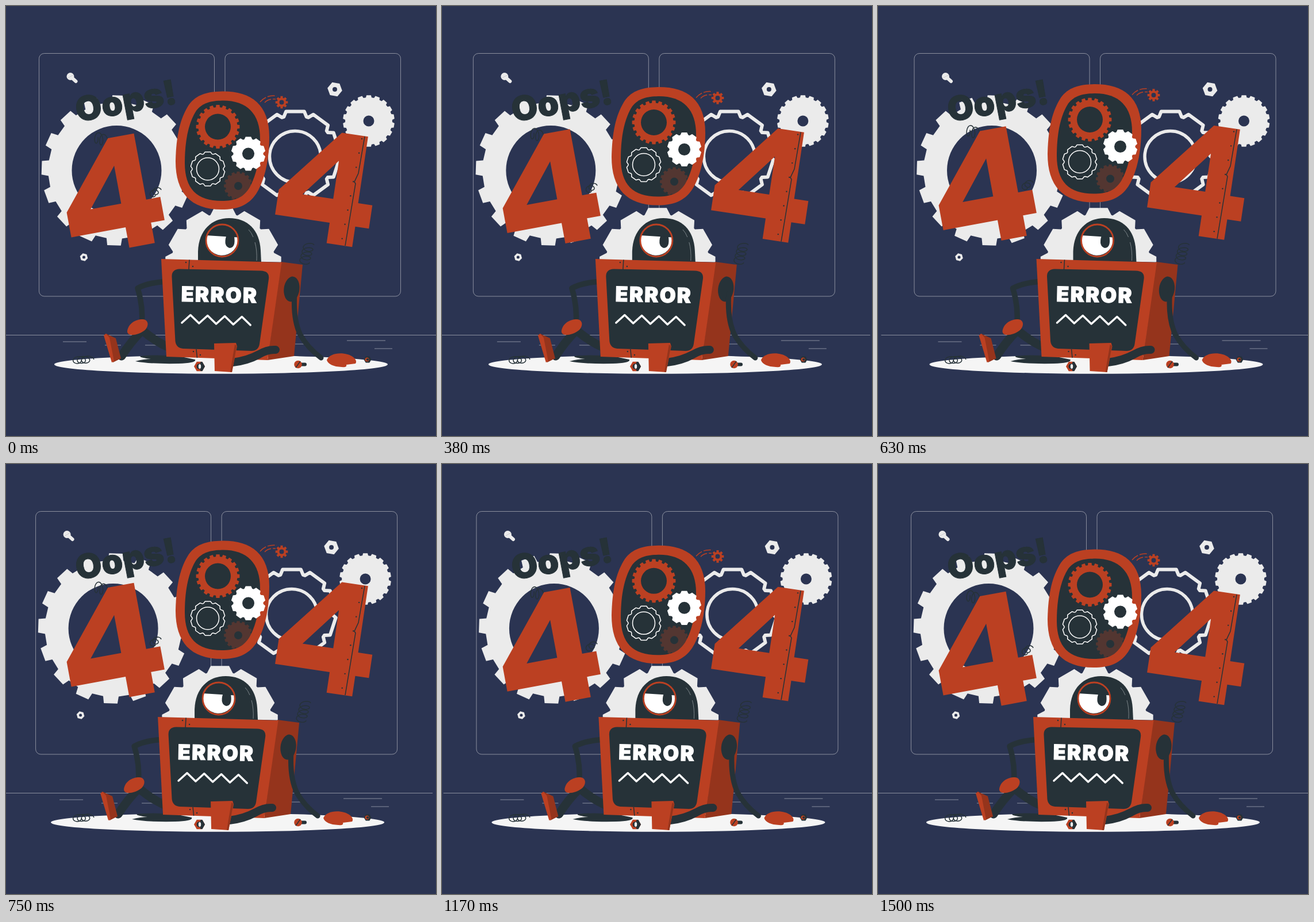
An HTML page for the animation above (1540 ms loop, 748 by 748 pixels).

```html
<!DOCTYPE html>
<html lang="en">
<head>
<meta charset="utf-8">
<title>404</title>
<style>
  html, body { margin: 0; width: 100%; height: 100%; overflow: hidden; background: #2b3452; }
  svg { display: block; width: 100vw; height: 100vh; }
  text { font-family: Inter, "Open Sans", sans-serif; font-weight: 900; }
  .ink { fill: #263238; }
  .red { fill: #bb4022; }
  .deep { fill: #95341c; }
  .pale { fill: #ebebeb; }
  .white { fill: #fff; }
  .faint { fill: #bb4022; opacity: .3; }
  .line { fill: none; stroke: #263238; stroke-width: 1.5; }
  .limb { fill: none; stroke: #263238; stroke-linejoin: round; stroke-linecap: round; }
  .wall { fill: none; stroke: #ebebeb; stroke-width: .5; }
</style>
</head>
<body>
<svg viewBox="0 0 748 748">
  <defs>
    <path id="four" fill-rule="evenodd" d="M-2 -158H44V-41H69V0H45V36H0V0H-96V-44Z M0 -109V-42H-54Z"/>
    <path id="slope" d="M125 202Q220 185 320 165"/>
    <clipPath id="aboveBox"><path d="M260 340H500V446L270 441Z"/></clipPath>
  </defs>

  <g id="shake">
    <g class="wall">
      <rect x="57.5" y="82.5" width="305" height="422.5" rx="9"/>
      <rect x="381" y="82.5" width="305.5" height="422.5" rx="9"/>
      <path d="M0 572.5H748M99 584H140M172 590H200M242 590H270M502 588H518M593 582H660M641 596H672"/>
    </g>
    <g id="wallGears"></g>
    <path d="M112 122.5L121.500 131" stroke="#ebebeb" stroke-width="6" stroke-linecap="round"/>
    <circle class="pale" cx="112" cy="122.500" r="6.500"/>
    <path d="M108 125L117 120" stroke="#c9c9cd"/>

    <ellipse cx="374" cy="623.5" rx="290" ry="16.200" fill="#f5f5f5"/>
    <path class="ink" d="M225 618Q240 614 252 614Q230 611 234 609Q255 606 300 609L329 615Q332 621 300 622Q250 623 225 618Z"/>
    <g id="domeGear" clip-path="url(#aboveBox)"></g>

    <path class="ink" d="M334 446V427C335 390 358 369 388 369C420 369 441 389 443 425L444 446Z"/>
    <path d="M422 389Q427 394 430 402M433 411Q437 425 436 443" fill="none" stroke="#7b8488"/>
    <circle cx="376" cy="408" r="28" class="ink"/>
    <path class="white" d="M348.500 399L403.500 402.500A28 28 0 1 1 348.500 399Z"/>
    <path class="ink" d="M383 400.500L397 401Q400 420 389 421Q378 418 383 400.500Z"/>
    <circle cx="376" cy="408" r="28" fill="none" stroke="#bb4022" stroke-width="2.8"/>

    <path class="limb" stroke-width="9.500" d="M274 479.500Q245 482 229 491Q238 520 236.500 548"/>
    <path class="limb" stroke-width="15" d="M284 594Q260 584 237 564Q217 584 201 609"/>
    <path class="red" d="M211 565C213 553 224 545 238 545C249 546 249 558 240 565C229 573 210 576 211 565Z"/>
    <path class="deep" d="M174 570L191 578L200 613L186 620L171 572Z"/>
    <path class="red" d="M170 573L174 570L180 577L188 618L184 620Z"/>

    <path class="deep" d="M478 445L516 450L501 609L455 616Z"/>
    <path class="red" d="M270 440L479.500 446L455 616L279 610Z"/>
    <path class="ink" d="M302 457.500L443 460.500Q459 461 457 475L441 588Q439 600 427 600L308 596Q296 595 294.500 583L288.500 471Q288 458 302 457.500Z"/>
    <path class="line" d="M319 441.500L318 458M331 597L332.500 612"/>
    <g id="rivets" class="ink"></g>
    <text class="white" font-size="36" letter-spacing="2.3" stroke="#fff" stroke-width="1.2" transform="translate(304.500 513.800) rotate(1.200)">ERROR</text>
    <path id="zigzag" fill="none" stroke="#fff" stroke-width="3.500" stroke-linecap="round" stroke-linejoin="round"/>

    <ellipse class="ink" cx="497" cy="492.500" rx="13.500" ry="22" transform="rotate(7 497 492)"/>
    <path class="limb" stroke-width="9" d="M502 500Q499 545 512 572Q525 595 548 612"/>
    <path class="red" d="M558 616C562 605 580 602 594 606C605 609 612 617 608 622L592 624Q594 629 584 628Q562 627 558 616Z"/>
    <path class="limb" stroke-width="14" d="M394 620Q420 617 440 606Q455 597 469 598"/>
    <path class="red" d="M362 587L400 586L402 592L393 637L363 635Z"/>
    <path class="deep" d="M398 589L401.500 591L393 637L390 636.500Z"/>
  </g>

  <g id="still">
    <text class="ink" font-size="59" stroke="#263238"><textPath href="#slope">Oops!</textPath></text>
    <path class="limb" stroke-width="6" d="M510 623.500H520"/>
    <circle class="red" cx="508" cy="623.500" r="6.800"/>
    <path class="line" d="M504 629L512 618"/>
  </g>

  <g id="float">
    <g id="springs"></g>
    <use href="#four" class="red" transform="translate(208 385) rotate(-10.500)"/>
    <use href="#four" class="red" transform="translate(563 377) rotate(8.500)"/>
    <path class="line" d="M624 227L613 291L606 306L608 309L590 417"/>
    <g id="bolts" class="ink"></g>
    <path class="red" d="M376 148.500C426 148 458 171 458 228C458 270 449 305 435 327C421 347 403 354 375 354C321 354 295 325 295 270C296 222 304 194 318 172C331 154 350 149 376 148.500Z"/>
    <path class="ink" d="M376 164.500C419 164 442 187 442 231C442 267 435 296 423 317C412 334 398 339 375 339C332 339 311 318 311 273C311 233 318 202 331 182C342 168 357 165 376 164.500Z"/>
    <g id="headGears"></g>
    <path d="M442 167Q453 154 471 156.500M450 168Q456 161 469 162" fill="none" stroke="#bb4022" stroke-width="1.500" stroke-dasharray="13 3"/>
  </g>
</svg>

<script>
const $ = id => document.getElementById(id);
const add = (id, ...markup) => $(id).insertAdjacentHTML('beforeend', markup.join(''));
const series = (n, make) => Array.from({ length: n }, (_, i) => make(i));
const polar = (x, y, r, a) => `${(x + r * Math.cos(a)).toFixed(1)} ${(y + r * Math.sin(a)).toFixed(1)}`;
const ring = (x, y, r) => `M${x - r} ${y}a${r} ${r} 0 1 0 ${2 * r} 0a${r} ${r} 0 1 0 ${-2 * r} 0Z`;
const dot = (x, y) => `<circle cx="${x}" cy="${y}" r="1.2"/>`;
const solid = (cls, shape) => `<path class="${cls}" fill-rule="evenodd" d="${shape}"/>`;
const outline = (color, width, shape) =>
  `<path fill="none" stroke="${color}" stroke-width="${width}" stroke-linejoin="round" d="${shape}"/>`;

// r valley radius, R tip radius, n teeth; tip and base are shares of the pitch.
function teeth(x, y, r, R, n, tip = .5, base = .65, turn = -90) {
  const pitch = 2 * Math.PI / n;
  const tooth = i => [[r, -base], [R, -tip], [R, tip], [r, base]]
    .map(([radius, share]) => polar(x, y, radius, turn * Math.PI / 180 + (i + share / 2) * pitch)).join('L');
  return `M${series(n, tooth).join('L')}Z`;
}
const gear = (cls, x, y, r, R, n, hole, ...shape) =>
  solid(cls, teeth(x, y, r, R, n, ...shape) + ring(x, y, hole));
const hexagon = (x, y, R, turn = 0) =>
  `M${series(6, i => polar(x, y, R, turn + i * Math.PI / 3)).join('L')}Z`;
const nut = (cls, x, y, R, hole, turn) => solid(cls, hexagon(x, y, R, turn) + ring(x, y, hole));

function spring(x1, y1, x2, y2, loops, rx, ry) {
  const steps = loops * 16;
  const point = i => {
    const k = i / steps, a = k * loops * 2 * Math.PI;
    return `${(x1 + (x2 - x1) * k + rx * Math.cos(a)).toFixed(1)} ${(y1 + (y2 - y1) * k + ry * Math.sin(a)).toFixed(1)}`;
  };
  return `<path class="line" d="M${series(steps + 1, point).join('L')}"/>`;
}

add('wallGears',
  gear('pale', 192.5, 286, 119, 131, 16, 78, .46, .58, 2),
  outline('#ebebeb', 6, teeth(503, 259, 69, 77, 10, .66, .92)),
  outline('#ebebeb', 5.5, ring(503, 262, 44.5)),
  gear('pale', 631, 200, 41, 45, 18, 9.5, .5, .7),
  nut('pale', 572, 145, 13, 4, .17),
  nut('pale', 135.5, 437, 7, 2.5, .26),
  spring(519, 446, 527, 416, 4, 9, 5));
add('domeGear', solid('pale', teeth(378, 452, 91, 102, 12, .6, .95)));
add('rivets', ...series(2, i => dot(313 + 12 * i, 446 + 7 * i) + dot(326 + 12 * i, 601 + 6 * i)));
add('bolts', ...series(8, i => dot(619 - 4.9 * i, 231 + 24.8 * i)));
$('zigzag').setAttribute('d', 'M' + series(9, i => `${306 + 14.9 * i} ${544 + i / 2 + (i % 2 ? -7 : 7)}`).join('L'));
add('still',
  solid('red', hexagon(336.5, 627, 9.5)),
  '<path class="ink" d="M338 619H341.500L346 627L341.500 635H338Z"/>',
  solid('ink', ring(336.5, 627, 5)),
  '<ellipse cx="337" cy="627" rx="2.200" ry="4" fill="#f5f5f5"/>',
  solid('ink', hexagon(629, 615, 6.5)),
  solid('red', ring(628, 615, 3.5)),
  solid('ink', ring(629, 615, 2)),
  spring(122, 616, 144, 615, 3, 9, 6));
add('springs', spring(155, 228, 172, 234, 2, 5, 10), spring(254, 328, 264, 320, 2, 6, 5));
add('headGears',
  gear('red', 368.5, 210, 34, 38, 20, 22.5),
  gear('faint', 404, 313, 22, 25, 16, 7),
  gear('white', 421.5, 257, 26, 30, 10, 10.5, .5, .85),
  outline('#fff', 1.5, teeth(351, 283.5, 27, 30, 10, .5, .9) + ring(351, 283.5, 19.5)),
  gear('red', 479.5, 167.5, 8, 11, 8, 4));

// CSS-style cubic-bezier(.36, .07, .19, .97)
function ease(x) {
  const curve = (a, b, s) => 3 * a * s * (1 - s) ** 2 + 3 * b * s * s * (1 - s) + s ** 3;
  let low = 0, high = 1;
  for (let i = 0; i < 20; i++) {
    const mid = (low + high) / 2;
    if (curve(.36, .19, mid) < x) low = mid; else high = mid;
  }
  return curve(.07, .97, low);
}

const LOOP = 1540, CYCLE = 1500, STEP = 1000 / 24, LAG = 12, SCALE = 748 / 500;

// Ten equal swings that grow until halfway, then mirror.
const swing = i => [0, -1, 2, -4, 4, -4][Math.min(i, 10 - i)];
function shakeAt(ms) {
  const at = (ms - LAG + CYCLE) % CYCLE / CYCLE * 10, i = Math.floor(at);
  return SCALE * (swing(i) + (swing(i + 1) - swing(i)) * ease(at - i));
}
const floatAt = ms => -10 * SCALE * (1 - Math.abs(1 - 2 * ms / CYCLE));

function draw(now) {
  const ms = Math.min(CYCLE, Math.floor((now % LOOP + 5) / STEP) * STEP);
  $('shake').setAttribute('transform', `translate(${shakeAt(ms).toFixed(2)} 0)`);
  $('float').setAttribute('transform', `translate(0 ${floatAt(ms).toFixed(2)})`);
}

const start = performance.now();
function tick() {
  draw(performance.now() - start);
  requestAnimationFrame(tick);
}
tick();
</script>
</body>
</html>
```
